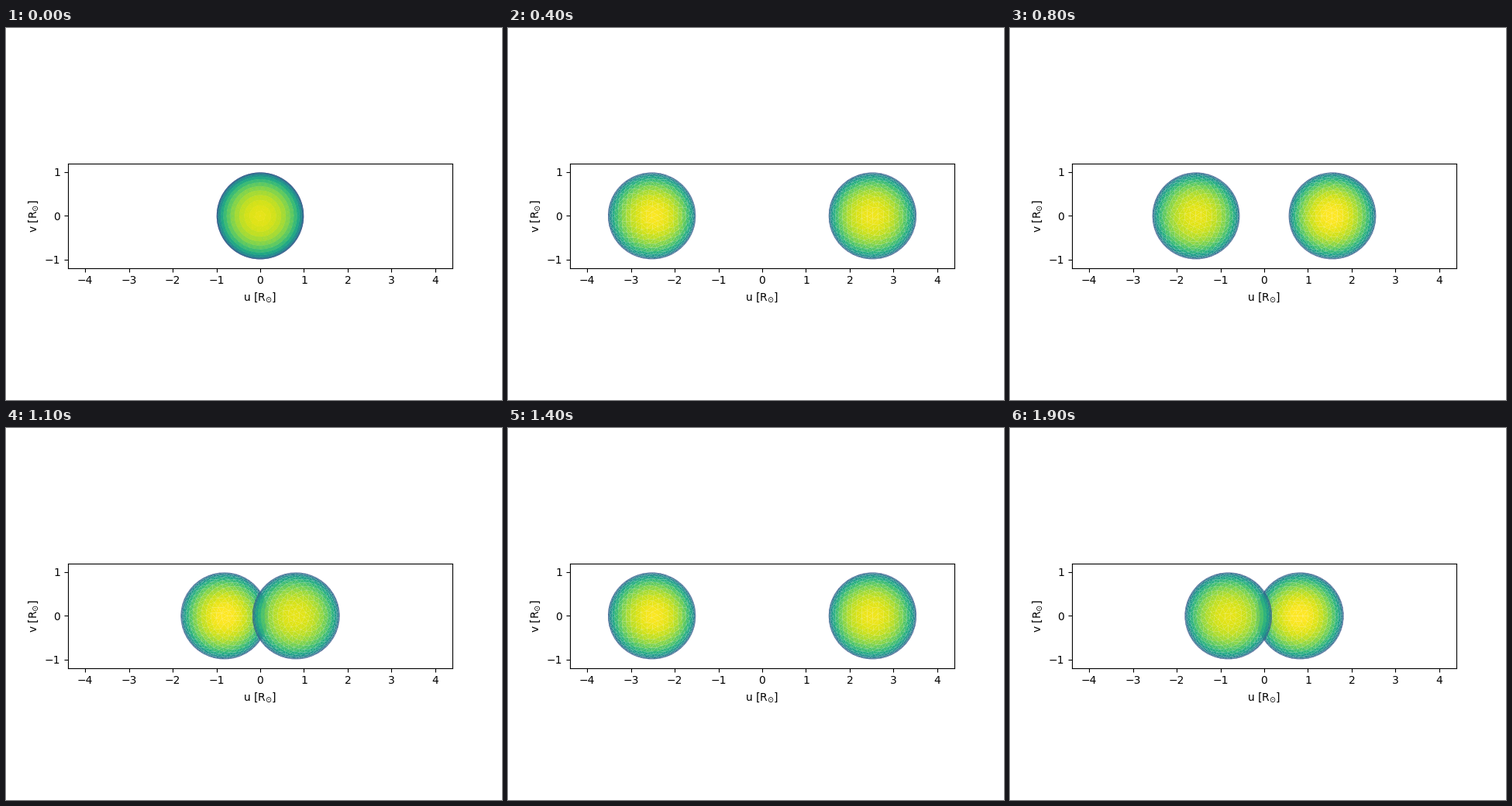
These frames come from a looping animation (640 by 480 pixels, 2 s). A matplotlib script:

```python
import numpy as np
import matplotlib.pyplot as plt
from matplotlib.animation import FuncAnimation
from matplotlib.collections import PolyCollection
from matplotlib.tri import Triangulation

FRAMES = 20
ORBIT = 2.65                              # each star's distance from the centre of mass
AXES = np.array([1.006, 0.997, 0.993])    # toward companion, sideways, polar
RINGS = 25
STEP = 0.133                              # vertex spacing along a ring


def sphere_mesh():
    """Triangulate a unit sphere from rings around its +x axis."""
    rng = np.random.default_rng(4)
    theta, azimuth = [0.0], [0.0]
    for k in range(1, RINGS):
        t = np.pi * k / RINGS
        n = round(2 * np.pi * np.sin(t) / STEP)
        shift = 0 if k < 4 else rng.random() * 2 * np.pi / n
        theta += [t] * n
        azimuth += list(shift + 2 * np.pi * np.arange(n) / n)
    theta, azimuth = np.array(theta), np.array(azimuth)

    # a planar Delaunay mesh of the stereographic view is Delaunay on the sphere
    r = np.tan(theta / 2)
    faces = Triangulation(r * np.cos(azimuth), r * np.sin(azimuth)).triangles
    pts = np.column_stack([np.cos(theta),
                           np.sin(theta) * np.cos(azimuth),
                           np.sin(theta) * np.sin(azimuth)])
    # close the far pole with a fan
    last = np.arange(len(pts) - n, len(pts))
    cap = np.column_stack([last, np.roll(last, -1), np.full(n, len(pts))])
    return np.vstack([pts, [-1, 0, 0]]), np.vstack([faces, cap])


points, faces = sphere_mesh()
tris = (points * AXES)[faces]
normals = np.cross(tris[:, 1] - tris[:, 0], tris[:, 2] - tris[:, 0])
normals /= np.linalg.norm(normals, axis=1)[:, None]
normals *= np.sign(np.sum(normals * tris.mean(axis=1), axis=1))[:, None]

# tidal gravity darkening and heating by the companion
facing = normals[:, 0]
surface = 1 - 0.02 * facing**2 + 0.045 * np.clip(facing, 0, None)


def star(angle):
    """Visible triangles, their colours and the depth of a star at an orbital angle."""
    s, c = np.sin(angle), np.cos(angle)
    frame = np.array([[-s, 0, -c], [-c, 0, s], [0, 1, 0]])
    mu = normals @ frame[:, 2]
    front = mu > 0
    verts = (tris[front] @ frame)[:, :, :2] + [ORBIT * s, 0]
    x = 1 - mu[front]
    light = (0.98 - 0.62 * x - 0.2 * x**2) * surface[front]
    return verts, plt.cm.viridis(np.clip(light, 0, 1)), c


fig, ax = plt.subplots(figsize=(6.4, 4.8), dpi=100)
ax.set_aspect("equal")
ax.set_xlim(-4.39, 4.39)
ax.set_ylim(-1.19, 1.19)
ax.set_xticks(range(-4, 5))
ax.set_yticks([-1, 0, 1])
ax.set_xlabel(r"u [$\mathrm{R_{\odot}}$]")
ax.set_ylabel(r"v [$\mathrm{R_{\odot}}$]")
mesh = PolyCollection([], linewidths=0, edgecolors="none")
ax.add_collection(mesh, autolim=False)


def update(i):
    angle = 2 * np.pi * i / FRAMES
    pair = sorted([star(angle), star(angle + np.pi)], key=lambda p: p[2])
    mesh.set_verts(np.concatenate([p[0] for p in pair]))
    mesh.set_facecolor(np.concatenate([p[1] for p in pair]))
    return [mesh]


anim = FuncAnimation(fig, update, frames=FRAMES, interval=100,
                     init_func=lambda: update(0), repeat=True, repeat_delay=0)
plt.show()
```
